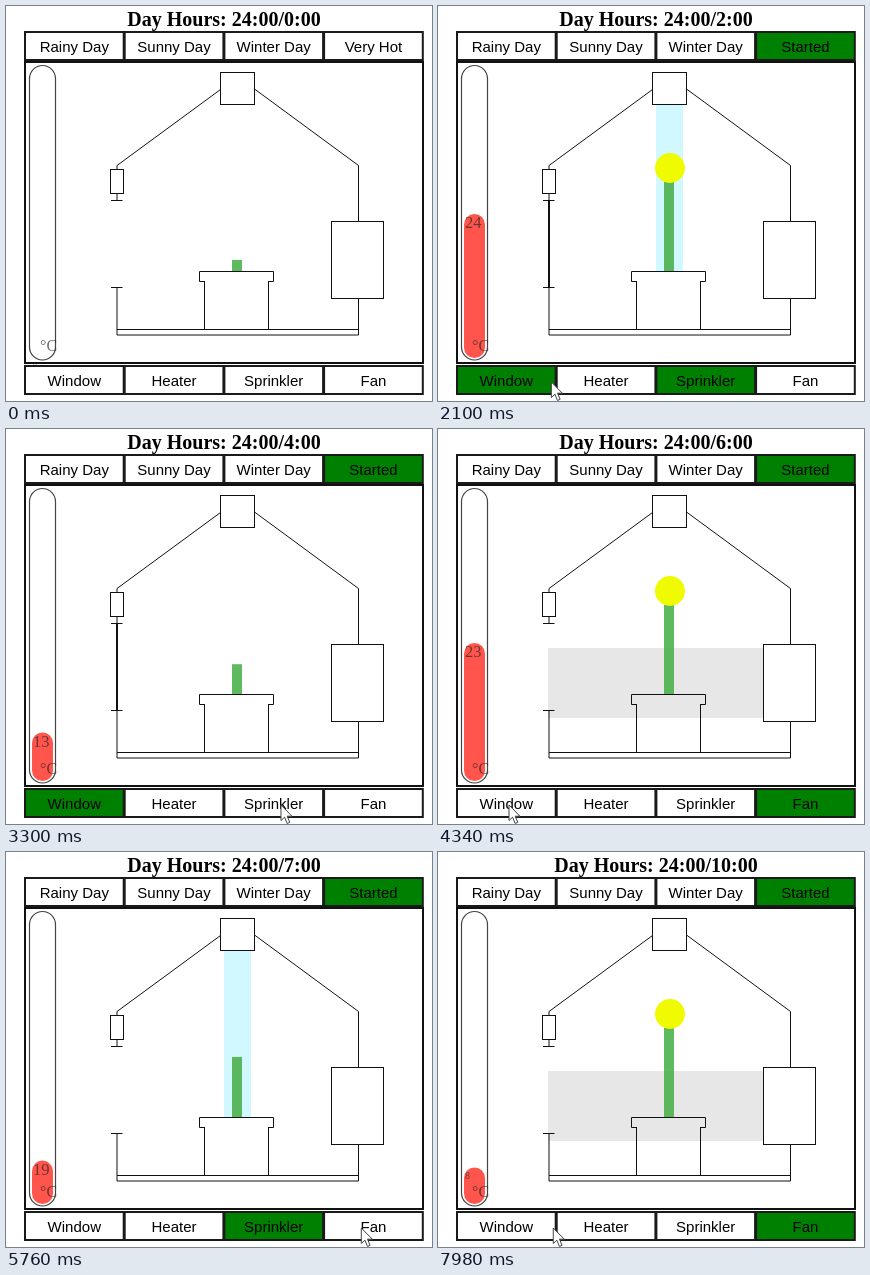
Recreate the animation shown at these times as an HTML page. Size 426x395 px, loop 8 s.

```html
<!DOCTYPE html>
<html lang="en">
<head>
<meta charset="utf-8">
<title>Greenhouse</title>
<style>
  html, body { margin: 0; width: 426px; height: 395px; overflow: hidden; background: #fff; }
  svg { display: block; }
  .line { fill: none; stroke: #111; stroke-width: 1; }
  .box { fill: #fff; stroke: #111; stroke-width: 1; }
  .button rect { fill: #fff; stroke: #1a1a1a; stroke-width: 2; }
  .button.on rect { fill: #008000; }
  .button text { font: 15px "Liberation Sans", Arial, sans-serif; text-anchor: middle; }
  #hours { font: bold 20px "Liberation Serif", Times, serif; text-anchor: middle; }
  .degree { font-family: "Liberation Serif", Times, serif; fill: #222; fill-opacity: .65; }
</style>
</head>
<body>
<svg width="426" height="395" viewBox="0 0 426 395">
  <text id="hours" x="218" y="20"></text>
  <rect x="19" y="56" width="398" height="301" fill="#fff" stroke="#111" stroke-width="2"/>

  <rect id="water" x="218" y="98" width="27" height="167" fill="#d2f8ff"/>
  <rect id="wind" x="110" y="219" width="215" height="70" fill="#e7e7e7"/>
  <rect id="stem" x="226" width="10" fill="#49b049" fill-opacity=".88"/>
  <circle id="flower" cx="232" cy="162" r="15" fill="#f0fb00"/>

  <path class="line" d="M214.5 83.5L111 159.5V163M248.5 83L352.5 159.5V215M352.5 292V329
    M111 188V194M105 194.5H116.5M105 281.5H116.5M111 281V329M111 323.5H352.5M111 329H352.5
    M198.5 275V323M262.5 275V323M198.5 275.5H193.5V265.5H267.5V275.5H262.5"/>
  <path id="pane" class="line" d="M111 194V281" style="stroke-width:2"/>
  <rect class="box" x="214.5" y="66.5" width="34" height="32"/>
  <rect class="box" x="104.5" y="163.5" width="13" height="24"/>
  <rect class="box" x="325.5" y="215.5" width="52" height="77"/>

  <rect x="23.5" y="59.5" width="26" height="294.5" rx="13" fill="#fff" stroke="#444" stroke-width="1.2"/>
  <rect id="fluid" x="26" width="21" rx="10.5" fill="#ff554c"/>
  <text class="degree" x="34" y="345" font-size="16">°C</text>
  <text id="label" class="degree" x="27"></text>

  <g id="buttons"></g>
  <path id="cursor" d="M0 0V15.5L3.6 12.2L6.2 18.5L8.8 17.3L6.2 11.2H11Z" fill="#fff" stroke="#444"/>
</svg>
<script>
const LOOP = 8000, BASE = 265, FULL = 89, TUBE_END = 352;
const GROWTH = 0.11, HEATING = 0.0866, DEGREE = 6; // px/ms, px/ms, px
const HOUR = 690, REST = 330;
const $ = id => document.getElementById(id);

function addRow(top, names) {
  return names.map((name, col) => {
    const x = 19 + col * 99.7;
    const el = document.createElementNS("http://www.w3.org/2000/svg", "g");
    el.setAttribute("class", "button");
    el.innerHTML = `<rect x="${x}" y="${top}" width="98.7" height="28"/>
      <text x="${x + 49.3}" y="${top + 19.5}">${name}</text>`;
    $("buttons").append(el);
    return { el, x: x + 49, y: top + 16 };
  });
}

const [, , , hot] = addRow(26, ["Rainy Day", "Sunny Day", "Winter Day", "Very Hot"]);
const [pane, , spray, fan] = addRow(360, ["Window", "Heater", "Sprinkler", "Fan"]);
const outside = { x: 440, y: 60 };

// The pointer travels from click to click; each click toggles its button
const clicks = [
  [120, outside], [380, hot], [1260, spray], [1760, pane], [3260, spray], [3800, fan], [4330, pane],
  [5060, spray], [5720, fan], [6760, pane], [6840, spray], [7340, pane], [7560, fan], [8060, pane],
].map(([at, button]) => ({ at, button }));

const sprouts = [-100, 3030, 5215];
const clockRests = [5230, 7000];
const climates = [[400, 24], [2740, 13], [3640, 23], [5260, 19], [7560, 8]];

const passed = (times, t) => times.filter(s => s <= t);
const isOn = (button, t) => clicks.filter(c => c.button === button && c.at <= t).length % 2 === 1;
const show = (el, on) => { el.style.display = on ? "" : "none"; };
const set = (el, attrs) => { for (const k in attrs) el.setAttribute(k, attrs[k]); };

function hourAt(t) {
  const rest = REST * passed(clockRests, t).length;
  return Math.max(0, Math.floor((t - 50 - rest) / HOUR));
}

function stemAt(t) {
  return Math.min(FULL, (t - passed(sprouts, t).pop()) * GROWTH);
}

// A warmer climate keeps the fluid rising, a colder one restarts it
function heatAt(t) {
  let since = t, temp = 0;
  for (const [at, next] of climates) {
    if (at > t) break;
    if (!temp || next < temp) since = at;
    temp = next;
  }
  return { temp, level: Math.min(temp * DEGREE, (t - since) * HEATING) };
}

function pointerAt(t) {
  const i = Math.max(1, clicks.findIndex(c => c.at > t));
  const a = clicks[i - 1], b = clicks[i];
  const k = Math.max(0, (t - a.at) / (b.at - a.at));
  const mix = axis => a.button[axis] + (b.button[axis] - a.button[axis]) * k;
  return [mix("x"), mix("y")];
}

function draw(t) {
  $("hours").textContent = `Day Hours: 24:00/${hourAt(t)}:00`;

  for (const { el, button } of [hot, pane, spray, fan].map(b => ({ el: b.el, button: b })))
    el.classList.toggle("on", isOn(button, t));
  hot.el.lastElementChild.textContent = isOn(hot, t) ? "Started" : "Very Hot";
  show($("pane"), isOn(pane, t));
  show($("wind"), isOn(fan, t));
  show($("water"), isOn(spray, t));

  const height = stemAt(t);
  set($("stem"), { y: BASE - height, height });
  show($("flower"), height === FULL);

  const { temp, level } = heatAt(t);
  const top = TUBE_END - level;
  const size = temp > 9 ? 16.5 : 10;
  set($("fluid"), { y: top, height: level });
  set($("label"), { y: top + 7 + size * 0.45, "font-size": size });
  $("label").textContent = temp || "°";

  const [x, y] = pointerAt(t);
  set($("cursor"), { transform: `translate(${x} ${y})` });
}

function frame() {
  draw(performance.now() % LOOP);
  requestAnimationFrame(frame);
}
frame();
</script>
</body>
</html>
```
